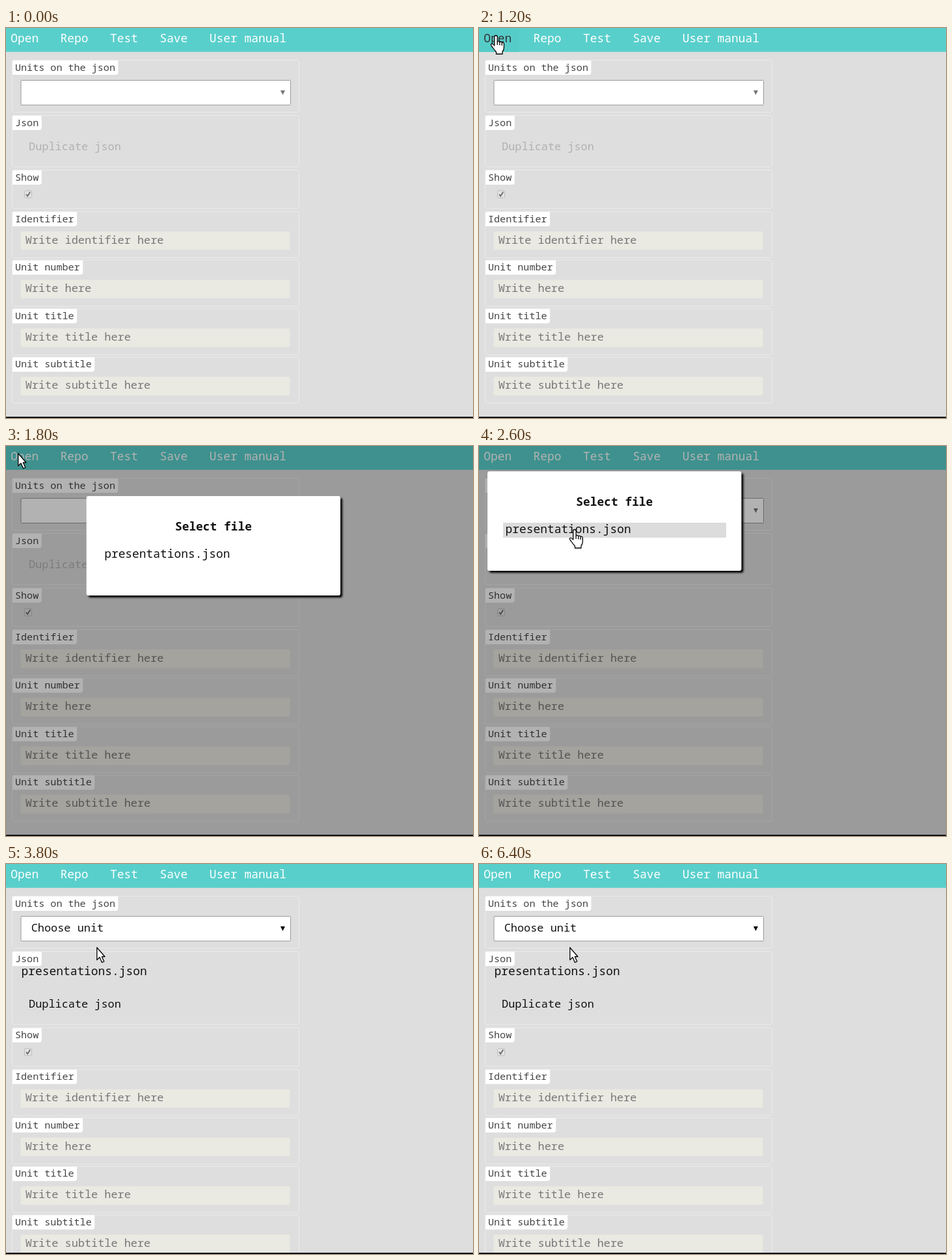
Write an HTML page that moves like this. It is 718 px wide and 600 px high and loops after 7200 ms.

```html
<!DOCTYPE html>
<html lang="en">
<head>
<meta charset="utf-8">
<title>Unit editor</title>
<style>
html, body { margin: 0; width: 100%; height: 100%; overflow: hidden; background: #dedede }
svg { display: block; width: 718px; height: 600px; font: 300 16.9px "Noto Sans Mono", "DejaVu Sans Mono", monospace }
text { white-space: pre; fill: #111 }
.box { fill: none; stroke: #ebebeb }
.label { font-size: 15.1px; fill: #444 }
.hint { fill: #777 }
.nav { font-size: 17.9px; font-weight: 500; fill: #fff }
.big { font-size: 17.9px }
.cursor path { fill: #fff; stroke: #000; stroke-width: 1.3; stroke-linejoin: round }
#popup { filter: drop-shadow(3px 3px 1.5px #000) }
</style>
</head>
<body>
<svg viewBox="0 0 718 600">
  <rect width="718" height="600" fill="#dedede"/>
  <rect width="718" height="36.7" fill="#59cfcb"/>
  <rect id="navHover" width="62" height="36.7" fill="#55ccc8"/>
  <g id="nav"></g>
  <g id="top"></g>
  <rect x="23" y="80.5" width="414.5" height="38" rx="1" fill="#fff" stroke="#999"/>
  <path id="arrow" d="M422 96h7l-3.5 7z"/>
  <g id="loaded">
    <text x="38.7" y="104">Choose unit</text>
    <text class="big" x="23.5" y="171">presentations.json</text>
  </g>
  <text id="duplicate" x="35" y="187.5">Duplicate json</text>
  <g id="rest">
    <rect x="28.5" y="250.3" width="11" height="11" rx="2" fill="#e4e4e4" stroke="#bbb"/>
    <path d="M31 255.8l2.2 2.8 4-6.3" fill="none" stroke="#707070" stroke-width="2"/>
  </g>
  <rect id="shade" width="718" height="600" opacity=".3"/>
  <g id="popup">
    <rect width="390.5" height="153" rx="3" fill="#fff"/>
    <text class="big" x="195.3" y="53" text-anchor="middle" font-weight="600">Select file</text>
    <rect id="row" x="24" y="79" width="343" height="23" fill="#dcdcdc"/>
    <text class="big" x="27.5" y="95">presentations.json</text>
  </g>
  <g id="cursor" class="cursor">
    <path id="pointer" d="M.8 .5V19.5L5 15.5 8.5 23.5 11.8 22 8.3 14.5H13Z"/>
    <g id="hand">
      <path d="M5.8 2.7a2.2 2.2 0 0 1 4.4 0V10q2-1.6 3.6.6 2-1.2 3.4.8 3-.8 3.2 2.2V19q0 4-2.4 6.5V29H8.5V26Q5 22 3 19 0 15.5 .6 14 2 12 5.8 16Z"/>
      <path d="M10.2 10v5M13.8 11v4.5M17.2 12v4"/>
    </g>
  </g>
  <rect y="598" width="718" height="2" fill="#111"/>
</svg>
<script>
const $ = id => document.getElementById(id);
const add = (id, markup) => $(id).insertAdjacentHTML("beforeend", markup);
const show = (id, on) => $(id).style.display = on ? "" : "none";
const move = (id, x, y) => $(id).setAttribute("transform", `translate(${x} ${y})`);
const mix = (a, b, k) => a + (b - a) * k;
const part = (t, from, to) => Math.min(1, Math.max(0, (t - from) / (to - from)));
const smooth = u => u * u * (3 - 2 * u);

// CSS ease-in-out, solved by bisection
function easeInOut(u) {
  let lo = 0, hi = 1;
  for (let i = 0; i < 24; i++) {
    const s = (lo + hi) / 2, r = 1 - s;
    if (1.26 * r * r * s + 1.74 * r * s * s + s ** 3 < u) lo = s; else hi = s;
  }
  return smooth(lo);
}

function fieldset(group, label, y, height, hint) {
  const w = 9.05 * label.length + 8.6;
  add(group, `<rect class="box" id="${label}" x="9.5" y="${y}" width="441" height="${height}" rx="3"/>
    <path fill="#fff" d="M10 ${y + .5}h${w}v18q0 4-4 4H10z"/>
    <text class="label" x="14" y="${y + 16}">${label}</text>`);
  if (hint) add(group, `<rect x="22.5" y="${y + 30.5}" width="414" height="28.5" rx="2" fill="#eae9e2"/>
    <text class="hint" x="29.7" y="${y + 49}">${hint}</text>`);
}

["Open", "Repo", "Test", "Save", "User manual"].forEach((name, i) =>
  add("nav", `<text class="nav" x="${7.2 + 76.4 * i}" y="22.4">${name}</text>`));
fieldset("top", "Units on the json", 49.5, 80);
fieldset("top", "Json", 134.5, 79);
fieldset("rest", "Show", 218.5, 59);
["identifier", "", "title", "subtitle"].forEach((word, i) =>
  fieldset("rest", ["Identifier", "Unit number", "Unit title", "Unit subtitle"][i],
    282.5 + 74.6 * i, 71, `Write ${word && word + " "}here`));

function draw(time) {
  const t = Math.floor(time % 7200 / 100) * 100;
  const loaded = t >= 2800, dimmed = t >= 1300 && t < 3800;

  const go = smooth(part(t, 100, 800)), pick = smooth(part(t, 2200, 2600));
  const x = mix(mix(547, 18, go), 139, pick), y = mix(mix(533, 11, go), 128, pick);
  const onOpen = t < 1700 && x < 62 && y < 37;
  const onRow = !loaded && pick > 0 && y > 117;
  const hand = onOpen && !dimmed || onRow;
  show("cursor", t >= 100);
  move("cursor", x, y);
  show("hand", hand);
  show("pointer", !hand);
  show("navHover", onOpen);
  $("nav").firstElementChild.style.fill = onOpen ? "#333" : "";

  const slide = easeInOut(part(t, 1220, 2020));
  show("popup", dimmed && !loaded);
  move("popup", mix(718, 13, slide), mix(280.5, 39, slide));
  show("row", onRow);
  show("shade", dimmed);

  const shift = loaded ? 33.5 : 0;
  show("loaded", loaded);
  move("rest", 0, shift);
  move("duplicate", 0, shift);
  $("Json").setAttribute("height", 79 + shift);
  $("duplicate").style.fill = loaded ? "" : "#b1b1b1";
  $("arrow").style.fill = loaded ? "#000" : "#777";
}

const start = performance.now();
function tick() {
  draw(performance.now() - start);
  requestAnimationFrame(tick);
}
tick();
</script>
</body>
</html>
```
